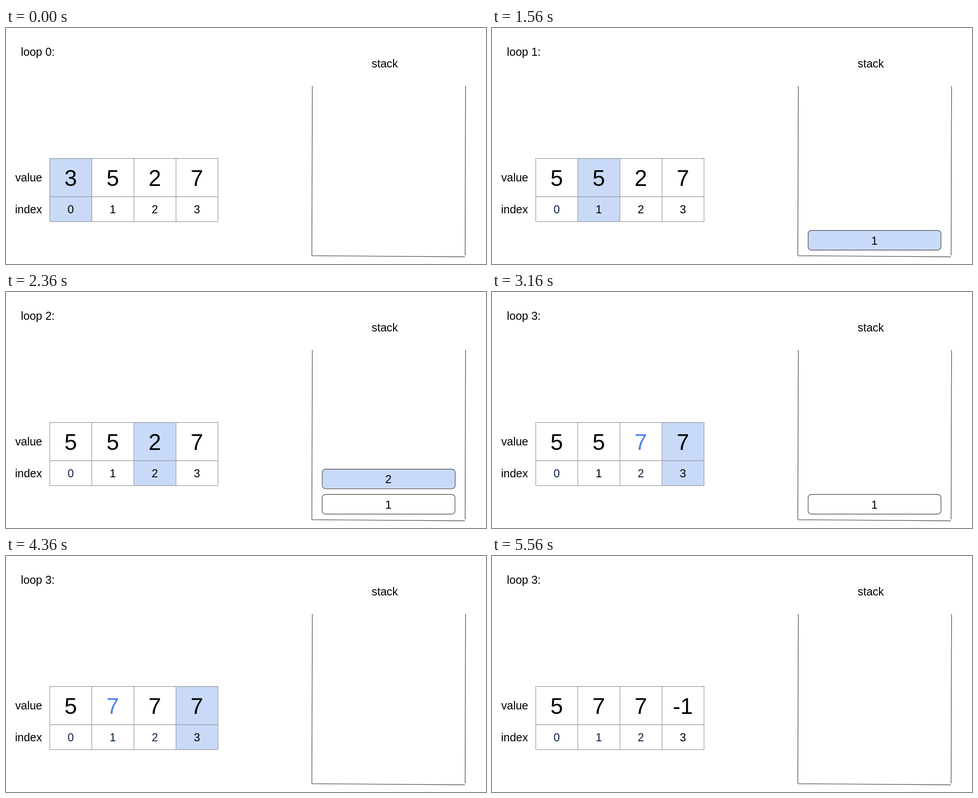
Write an HTML page that moves like this. It is 1064x526 px and loops after 5960 ms.

```html
<!DOCTYPE html>
<html lang="en">
<head>
<meta charset="utf-8">
<title>Stack walkthrough</title>
<style>
html, body { margin: 0; width: 100%; height: 100%; overflow: hidden; background: #fff; }
svg { display: block; width: 1064px; height: 526px; font: 25px "Liberation Sans", Arial, sans-serif; }
.big { font-size: 50px; }
.mid { text-anchor: middle; }
.grid { stroke: #9e9e9e; stroke-width: 1.4; fill: none; }
.ink { stroke: #505050; stroke-width: 1.4; fill: none; }
</style>
</head>
<body>
<svg viewBox="0 0 1064 526">
  <text x="20.5" y="342">value</text>
  <text x="20" y="413">index</text>
  <text x="810.5" y="88">stack</text>
  <g id="scene"></g>
  <path class="grid" d="M96.3 290.7H470.7M96.3 376H470.7M96.3 431.5H470.7M97 290.7V431.5M190.2 290.7V431.5M283.5 290.7V431.5M376.8 290.7V431.5M470 290.7V431.5"/>
  <g id="labels"></g>
  <path class="ink" d="M679 129L678 507M678 507.5L1017 510M1018.7 129L1017.7 507"/>
</svg>
<script>
const PERIOD = 5960;
const FILL = { b: '#c9daf8', p: '#f4cccc', w: '#fff' };
const NEW = '#4a86e8', DONE = '#0b1f42';

// fills: one letter per cell; stack: index + fill, bottom first;
// fresh: cell just rewritten; done: resolved cells; sign: x of a comparison
const steps = [
  { at: 0,    loop: 0, values: [3, 5, 2, 7], fills: 'bwww', stack: [] },
  { at: 350,  stack: ['0b'] },
  { at: 750,  loop: 1, fills: 'pbww', stack: ['0p'], sign: [188, '<'] },
  { at: 1170, values: [5, 5, 2, 7], fills: 'wbww', stack: [], fresh: 0, done: '0' },
  { at: 1560, stack: ['1b'] },
  { at: 1960, loop: 2, fills: 'wpbw', stack: ['1p'], sign: [282, '>'] },
  { at: 2360, fills: 'wwbw', stack: ['1w', '2b'] },
  { at: 2760, loop: 3, fills: 'wwpb', stack: ['1w', '2p'], sign: [375, '<'] },
  { at: 3160, values: [5, 5, 7, 7], fills: 'wwwb', stack: ['1w'], fresh: 2, done: '02' },
  { at: 3560, fills: 'wpwb', stack: ['1p'] },
  { at: 3940, arc: true },
  { at: 4360, values: [5, 7, 7, 7], fills: 'wwwb', stack: [], fresh: 1, done: '012' },
  { at: 4760, stack: ['3b'] },
  { at: 5160, loop: 4, fills: 'wwwp', stack: ['3p'] },
  { at: 5560, loop: 3, values: [5, 7, 7, -1], fills: 'wwww', stack: [] }
];

// carry lasting properties forward; fresh, sign and arc belong to one step only
let kept = { done: '' };
const states = steps.map(step => {
  const state = { ...kept, ...step };
  const { fresh, sign, arc, ...rest } = state;
  kept = rest;
  return state;
});

const scene = document.getElementById('scene');
const labels = document.getElementById('labels');
const text = (x, y, s, fill = '#000', cls = 'mid') =>
  `<text x="${x}" y="${y}" fill="${fill}" class="${cls}">${s}</text>`;
const sign = (x, y, s) => text(x, y, s === '<' ? '&lt;' : '&gt;', '#000', 'mid big');

function arc() {
  return '<path class="ink" d="M236.5 290.7C236.5 237 423.5 237 423.5 283"/>' +
    '<path fill="#505050" d="M417.5 280H429.5L423.5 290.7Z"/>' + sign(330, 248, '<');
}

function render(s) {
  let back = text(33, 61.5, `loop ${s.loop}:`, '#000', '');
  let front = '';
  s.values.forEach((v, i) => {
    const x = 97 + i * 93.25, mid = x + 46.4;
    back += `<rect x="${x}" y="290.7" width="93.25" height="140.8" fill="${FILL[s.fills[i]]}"/>`;
    front += text(mid, 352, v, s.fresh === i ? NEW : '#000', 'mid big');
    front += text(mid, 413, i, s.done.includes(i) ? DONE : '#000');
  });
  s.stack.forEach(([index, fill], i) => {
    const y = 451.2 - i * 56.4;
    front += `<rect class="ink" x="${700.7 + i * 0.4}" y="${y}" width="294.6" height="43.8" rx="7.5" style="fill:${FILL[fill]}"/>`;
    front += text(847.7, y + 31.6, index);
  });
  if (s.sign) front += sign(s.sign[0], 354, s.sign[1]);
  if (s.arc) front += arc();
  scene.innerHTML = back;
  labels.innerHTML = front;
}

let shown;
const start = performance.now();
function tick() {
  const t = (performance.now() - start) % PERIOD;
  const state = states.findLast(s => s.at <= t);
  if (state !== shown) render(shown = state);
  requestAnimationFrame(tick);
}
tick();
</script>
</body>
</html>
```
